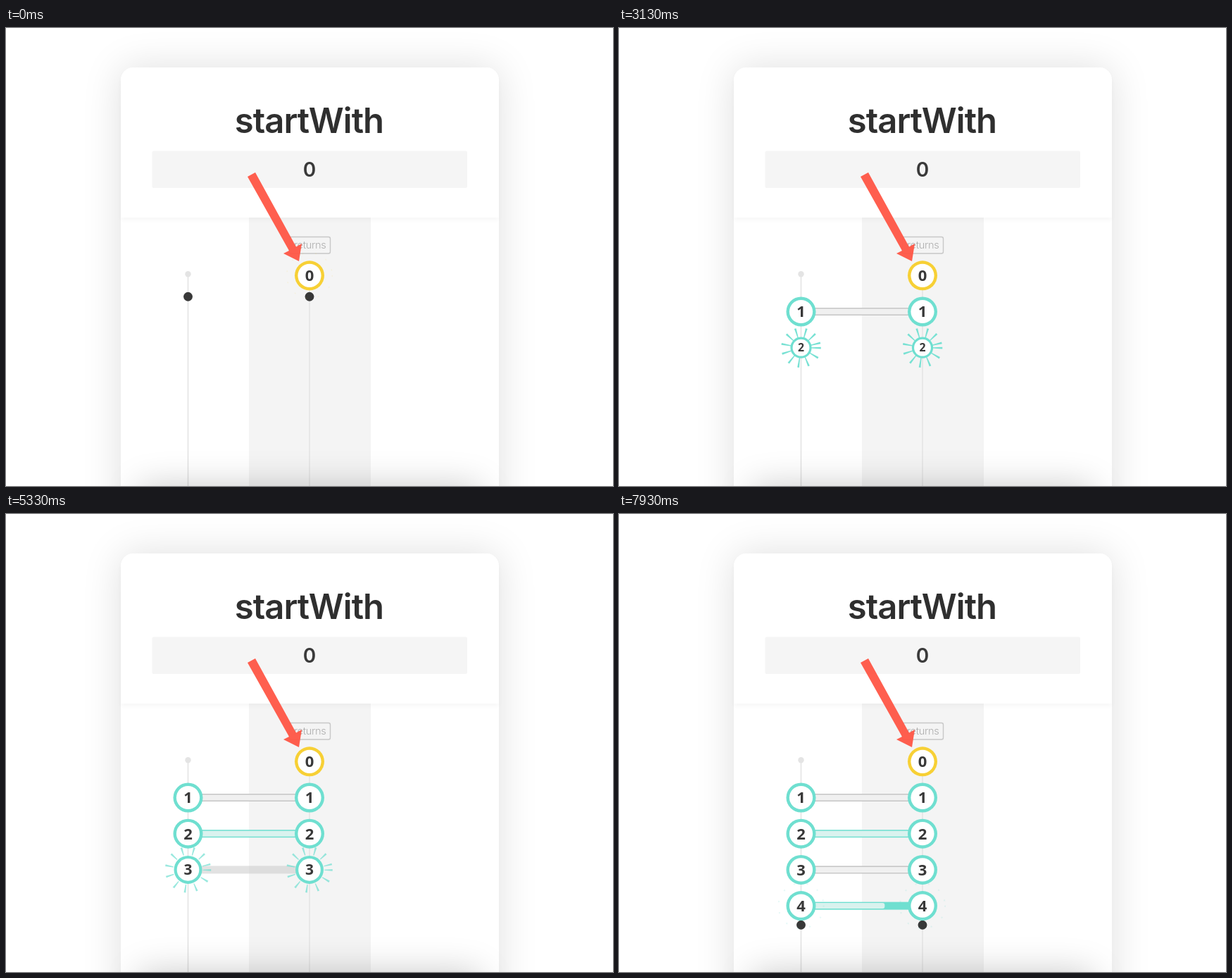
Animation of 862x650 px, one loop 8000 ms. Source, as an HTML page with a canvas:

```html
<!DOCTYPE html>
<html lang="en">
<head>
<meta charset="utf-8">
<title>startWith</title>
<style>
  html, body { margin: 0; width: 100%; height: 100%; overflow: hidden; background: #fff; }
  #stage { position: relative; width: 862px; height: 650px; overflow: hidden; }
  #stage > * { position: absolute; }
  svg, canvas { left: 0; top: 0; }
  .card { left: 162.5px; top: 55.5px; width: 537px; height: 700px; border-radius: 18px;
    background: #fff; box-shadow: 0 0 55px rgba(0, 0, 0, .13); }
  .column { left: 345px; top: 269px; width: 172.5px; height: 381px; background: #f4f4f4; }
  .header { left: 162.5px; top: 55.5px; width: 537px; height: 213px; border-radius: 18px 18px 0 0;
    background: #fff; box-shadow: 0 4px 6px rgba(0, 0, 0, .03); }
  .below { left: 190px; top: 651px; width: 482px; height: 60px;
    box-shadow: 0 0 50px rgba(0, 0, 0, .22); }
  text { text-anchor: middle; font-family: Inter, sans-serif; }
</style>
</head>
<body>
<div id="stage">
  <div class="card"></div>
  <div class="column"></div>
  <div class="header"></div>
  <svg width="862" height="650">
    <text x="430.5" y="149" font-size="49" font-weight="600" letter-spacing="-.02em" fill="#2f2f2f">startWith</text>
    <rect x="207.5" y="174.5" width="447.5" height="52.5" rx="2" fill="#f5f5f5"/>
    <text x="431" y="211" font-size="28" font-weight="600" fill="#3a3a3a">0</text>
    <g stroke="#e2e2e2" stroke-width="1.5">
      <path d="M258.5 349V650M431 351V650"/>
    </g>
    <circle cx="258.5" cy="349.3" r="4.2" fill="#e4e4e4"/>
    <rect x="402.5" y="296.5" width="58" height="23.5" rx="2.5" fill="none" stroke="#c8c8c8" stroke-width="1.4"/>
    <text x="431.7" y="312.5" font-size="14.5" font-weight="300" letter-spacing="-.02em" fill="#aeaeae">returns</text>
    <path d="M343 211L354 205L412 310.5L420 306L416 331L394 320L402 316Z" fill="#ff5644" fill-opacity=".94"/>
  </svg>
  <canvas id="marbles" width="862" height="650"></canvas>
  <div class="below"></div>
</div>
<script>
const ctx = document.getElementById('marbles').getContext('2d');
const LOOP = 8000, PERIOD = 2010, FIRST = 835;
const LEFT = 258.5, RIGHT = 431, TOP = 351.3, GAP = 51.2;
const TEAL = '#6fdfd0', YELLOW = '#f7d035';
const RAY_ANGLES = [1, 31, 67, 98, 129, 162, 191, 223, 253, 286, 316, 346];

const clamp = v => Math.max(0, Math.min(1, v));
const easeOut = (v, power) => 1 - (1 - clamp(v)) ** power;
const smooth = v => { v = clamp(v); return v * v * (3 - 2 * v); };

function disc(x, y, r, color) {
  ctx.fillStyle = color;
  ctx.beginPath();
  ctx.arc(x, y, r, 0, 2 * Math.PI);
  ctx.fill();
}

function pipe(y, age, color, light) {
  ctx.globalAlpha = clamp((age - 300) / 350);
  ctx.fillStyle = color;
  ctx.fillRect(LEFT, y - 5.5, RIGHT - LEFT, 11);
  const filled = smooth((age - 500) / 900) * (RIGHT - LEFT);
  if (filled > 0) {
    ctx.fillStyle = light;
    ctx.beginPath();
    ctx.roundRect(LEFT, y - 4, filled, 8, Math.min(3, filled / 2));
    ctx.fill();
  }
  ctx.globalAlpha = 1;
}

function marble(x, y, age, label, color) {
  const scale = easeOut(age / 610, 2);
  ctx.save();
  ctx.translate(x, y);
  ctx.scale(scale, scale);
  disc(0, 0, 21, color);
  disc(0, 0, 16.6, '#fff');
  ctx.fillStyle = '#383838';
  ctx.font = '700 22px "Open Sans", sans-serif';
  ctx.textAlign = 'center';
  ctx.fillText(label, 0, 7.8);
  ctx.restore();
}

// Tapered rays whose inner ends catch up with the outer ones while fading.
function burst(x, y, age, color) {
  const life = age / 1570;
  if (life >= 1) return;
  const inner = 32 * easeOut(life, 3), outer = 33 * easeOut(age / 600, 3);
  if (outer <= inner) return;
  ctx.fillStyle = color;
  ctx.globalAlpha = clamp(1.35 * (1 - life) ** 1.8);
  for (const angle of RAY_ANGLES) {
    ctx.save();
    ctx.translate(x, y);
    ctx.rotate(angle * Math.PI / 180);
    ctx.beginPath();
    ctx.moveTo(inner, -.6);
    ctx.lineTo(outer, -1.4);
    ctx.lineTo(outer, 1.4);
    ctx.lineTo(inner, .6);
    ctx.fill();
    ctx.restore();
  }
  ctx.globalAlpha = 1;
}

function draw(t) {
  ctx.clearRect(0, 0, 862, 650);
  const dotY = TOP + GAP * (1 + (t - FIRST) / PERIOD);
  for (const x of [LEFT, RIGHT]) disc(x, dotY, 6.4, '#383838');

  for (let n = 0; n <= 4; n++) {
    const age = t - FIRST - (n - 1) * PERIOD;
    if (age <= 0) continue;
    const y = TOP + n * GAP, color = n ? TEAL : YELLOW;
    if (n) pipe(y, age, ...(n % 2 ? ['#c6c6c6', '#f0f0f0'] : [TEAL, '#d9f2ee']));
    for (const x of n ? [LEFT, RIGHT] : [RIGHT]) {
      marble(x, y, age, n, color);
      burst(x, y, age, color);
    }
  }
}

const start = performance.now();
function frame() {
  draw((performance.now() - start) % LOOP);
  requestAnimationFrame(frame);
}
frame();
</script>
</body>
</html>
```
